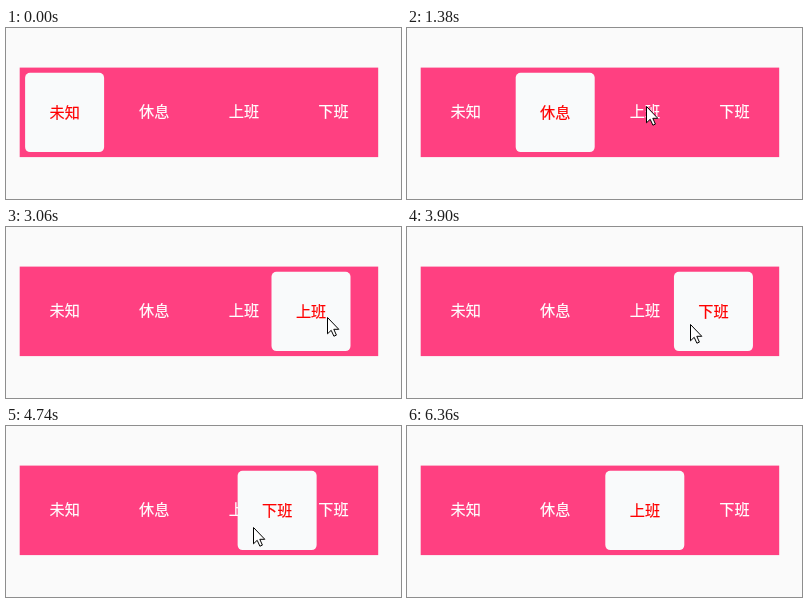
Recreate the animation shown at these times as an HTML page. Size 395 px wide and 171 px high, loop 7.14 s.

```html
<!DOCTYPE html>
<html lang="zh-CN">
<head>
<meta charset="utf-8">
<title>滑动选择器</title>
<style>
  html, body { margin: 0; width: 100%; height: 100%; overflow: hidden; background: #fafafa; }
  svg { display: block; width: 395px; height: 171px; }
  text {
    font: 15.2px "Noto Sans CJK SC", "Noto Sans CJK", sans-serif;
    text-anchor: middle; stroke: currentColor; fill: currentColor; stroke-width: .2;
  }
  #labels { color: #fff; }
  #thumb { color: #f00; }
</style>
</head>
<body>
<svg viewBox="0 0 395 171">
  <rect x="13.7" y="39.6" width="358.5" height="89.5" fill="#ff4081"/>
  <g id="labels"></g>
  <g id="thumb">
    <rect y="44.7" width="79" height="79.4" rx="5" fill="#f9fafb"/>
    <text id="choice" x="39.6" y="90"></text>
  </g>
  <path id="cursor" d="M.5 .5V16.8L4.2 13.3L6.9 19.2L9.4 18.1L6.8 12.3H11.8Z" fill="#fff" stroke="#000"/>
</svg>
<script>
const LOOP = 7140, TICK = 60, SNAP_TIME = 240;
const SLOT = 89.6, TRACK = 14, FIRST = 19.1, SLOP = 6;
const names = ['未知', '休息', '上班', '下班'];

const byId = id => document.getElementById(id);
const slotX = i => FIRST + SLOT * i;
const clamp = k => Math.max(0, Math.min(1, k));
const ease = k => (1 - Math.cos(Math.PI * clamp(k))) / 2;
const mix = (a, b, k) => a + (b - a) * k;

// The pointer rests between glides
const entry = { x: 373, y: 37 };
const glides = [
  { at: 60, time: 360, x: 139, y: 95 },
  { at: 540, time: 120, x: 149, y: 87 },
  { at: 1080, time: 300, x: 239, y: 78 },
  { at: 2030, time: 490, x: 321, y: 90 },
  { at: 3420, time: 360, x: 283, y: 97 },
  { at: 4080, time: 180, x: 309, y: 101 },
  { at: 4400, time: 380, x: 245, y: 101 },
  { at: 5340, time: 480, x: 234, y: 102 },
  { at: 6000, time: 340, x: 390, y: 105 }
];
// A tap picks the slot under the pointer; a drag (with press) the nearest slot
const gestures = [
  { release: 930 }, { release: 1860 }, { release: 2900 },
  { press: 3420, release: 3804 }, { press: 4380, release: 5080 }
];

function pointer(t) {
  return glides.reduce((p, g) => {
    const k = ease((t - g.at) / g.time);
    return { x: mix(p.x, g.x, k), y: mix(p.y, g.y, k) };
  }, entry);
}

function dragged(home, press, t) {
  return home + Math.min(0, pointer(t).x - pointer(press).x + SLOP);
}

function thumbState(t) {
  let index = 0;
  for (const { press, release } of gestures) {
    if (t < (press ?? release)) break;
    const home = slotX(index);
    const from = press ? dragged(home, press, Math.min(t, release)) : home;
    if (t < release) return { x: from, index };
    const target = press
      ? Math.round((from - FIRST) / SLOT)
      : Math.floor((pointer(release).x - TRACK) / SLOT);
    const k = (t - release) / SNAP_TIME;
    if (k < 1) return { x: mix(from, slotX(target), ease(k)), index };
    index = target;
  }
  return { x: slotX(index), index };
}

function render(ms) {
  const t = Math.floor((ms % LOOP) / TICK) * TICK;
  const { x, index } = thumbState(t);
  const p = pointer(t);
  byId('thumb').setAttribute('transform', `translate(${x} 0)`);
  byId('choice').textContent = names[index];
  byId('cursor').setAttribute('transform', `translate(${Math.round(p.x)} ${Math.round(p.y)})`);
  byId('cursor').setAttribute('visibility', t >= 60 && t < 6360 ? 'visible' : 'hidden');
}

byId('labels').innerHTML = names
  .map((name, i) => `<text x="${slotX(i) + 39.6}" y="89.4">${name}</text>`).join('');

let start;
function frame(now) {
  start ??= now;
  render(now - start);
  requestAnimationFrame(frame);
}
render(0);
requestAnimationFrame(frame);
</script>
</body>
</html>
```
